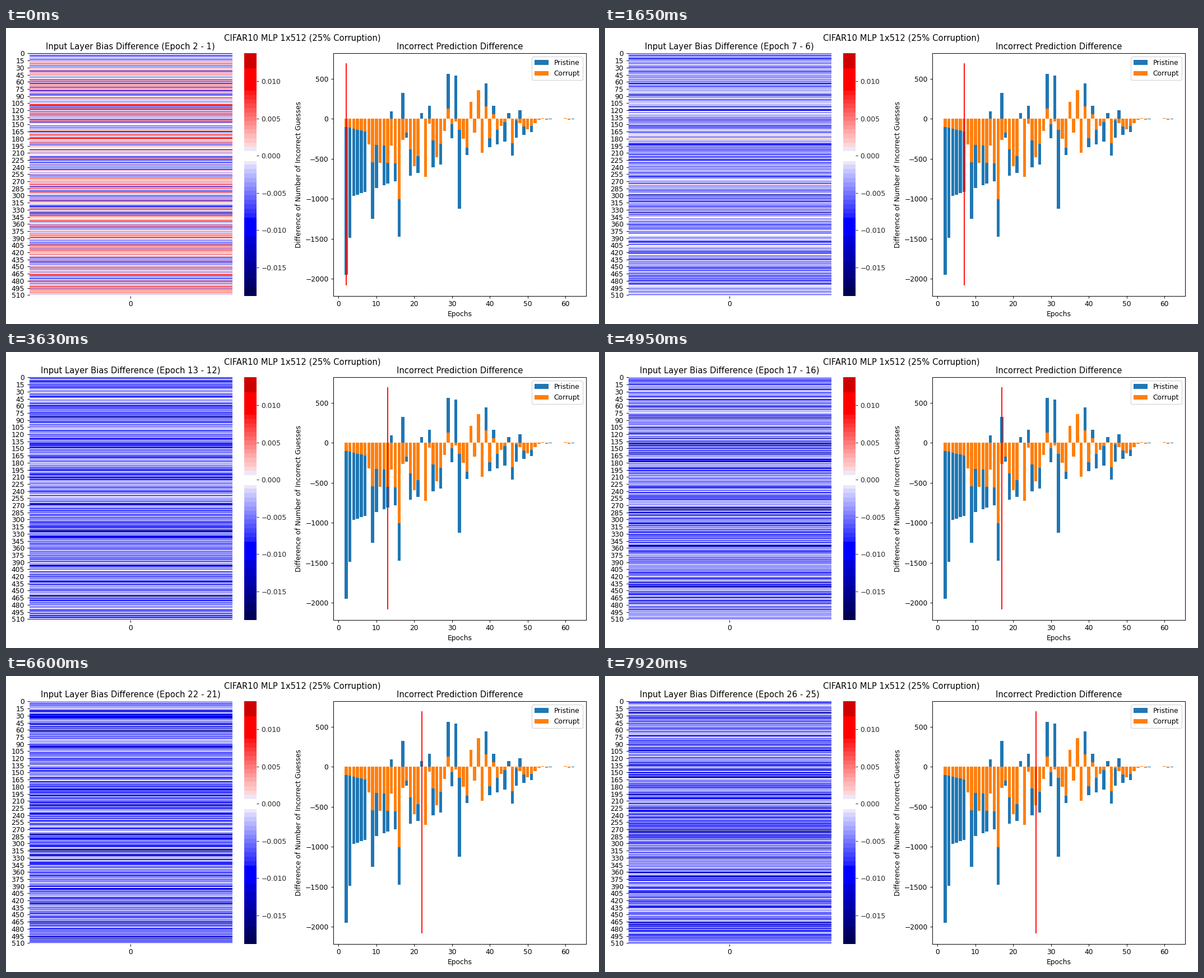
Recreate the animation shown at these times as a matplotlib script. Size 1058 by 529 pixels, loop 8 s.

```python
import numpy as np
import matplotlib.pyplot as plt
from matplotlib.animation import FuncAnimation
from matplotlib.colors import BoundaryNorm, ListedColormap

W, H = 1058, 529
LOOP, INTERVAL, HOLD = 8000, 50, 330      # milliseconds
FIRST, LAST = 2, 26
ROWS = 512
TOP, BOTTOM = 45, 478.5                   # shared by all axes, in pixels
VMIN, VMAX = -0.0188, 0.01376

plt.rcParams["font.family"] = "DejaVu Sans"
fig = plt.figure(figsize=(12, 6), dpi=W / 12, facecolor="white")


def add_axes(left, right):
    return fig.add_axes([left / W, 1 - BOTTOM / H,
                         (right - left) / W, (BOTTOM - TOP) / H])


def color_bands():
    """Return edges, centres and colours of the stepped scale around zero."""
    edges = np.concatenate([
        np.linspace(VMIN, -0.0108, 8),
        np.linspace(-0.0083, -0.0012, 13), [-0.0007, 0.0006],
        np.linspace(0.0012, 0.0087, 14), [0.0117, VMAX]])
    mids = (edges[:-1] + edges[1:]) / 2
    colors = plt.get_cmap("seismic")(0.5 + 0.5 * mids / -VMIN)
    size = np.abs(mids)
    colors[size < 0.0011] = (0.93, 0.905, 0.97, 1)
    colors[size < 0.0002] = (1, 1, 1, 1)
    colors[np.abs(mids - 0.0102) < 0.001] = (1, 0, 0, 1)
    colors[np.abs(mids + 0.0095) < 0.001] = (0, 0, 1, 1)
    colors[-1] = (0.81, 0, 0, 1)
    return edges, mids, colors


def bias_change(epoch):
    """Bias changes fade from mixed signs to mostly negative ones."""
    mixed = np.random.default_rng(3).normal(-0.0008, 0.0047, ROWS)
    settled = -np.random.default_rng([11, epoch]).gamma(2.3, 0.0024, ROWS)
    weight = np.exp((FIRST - epoch) / 5)
    values = weight * mixed + (1 - weight) * settled
    return np.clip(values, VMIN + 1e-6, VMAX - 1e-6)[:, None]


def pristine_counts(epochs):
    """Linear recovery with gaps, plus the outstanding peaks."""
    gaps = {*range(8, 21, 3), *range(22, 29, 2), *range(29, 46, 2), 36, 48, 50}
    peaks = {2: -1950, 3: -1490, 9: -1250, 14: 95, 16: -1475, 17: 320,
             18: -235, 22: 70, 24: 160, 29: 560, 30: -245, 31: 540,
             32: -1125, 39: 440, 41: 165, 45: 75, 46: -460, 48: 105}

    def height(e):
        if e > 51:
            return -5 if e % 6 == 2 else 0
        return peaks.get(e, 0 if e in gaps else 17 * (e - 2) - 1000)

    return [height(e) for e in epochs]


def corrupt_counts(epochs):
    """A curve through a few points, plus the outstanding peaks."""
    curve = {2: -100, 7: -160, 8: -430, 15: -450, 18: -170, 20: -595,
             21: -470, 24: -60, 26: -480, 28: -150, 31: -30, 34: -360,
             36: -170, 40: -240, 45: 10, 47: -20, 50: -130, 53: -15, 54: 0}
    peaks = {16: -1005, 22: 0, 23: -725, 29: 125, 35: 210, 37: 355,
             38: -425, 39: 155, 41: 55, 46: -305}

    def height(e):
        if e > 53:
            return {0: 8, 1: -12}.get(e % 6, 0)
        swing = 110 * (-1) ** e if 8 <= e <= 15 else 0
        return peaks.get(e, np.interp(e, [*curve], [*curve.values()]) + swing)

    return [height(e) for e in epochs]


edges, mids, colors = color_bands()
cmap = ListedColormap(colors)
norm = BoundaryNorm(edges, len(colors))
changes = {e: bias_change(e) for e in range(FIRST, LAST + 1)}

# Heatmap
heat = add_axes(41.5, 403)
image = heat.imshow(changes[FIRST], cmap=cmap, norm=norm, aspect="auto",
                    interpolation="nearest", extent=(0, 1, ROWS, 0))
heat.set_xticks([0.5], ["0"])
labels = range(0, ROWS, 15)
heat.set_yticks([n + 0.5 for n in labels], [str(n) for n in labels])
heat.spines[:].set_visible(False)
heat_title = heat.set_title("")

# Colour scale
scale = add_axes(425, 447)
scale.pcolormesh([0, 1], edges, mids[:, None], cmap=cmap, norm=norm)
scale.set_ylim(VMIN, VMAX)
scale.set_xticks([])
scale.yaxis.tick_right()
ticks = [n / 1000 for n in range(-15, 11, 5)]
scale.set_yticks(ticks, [f"{v:.3f}".replace("-", "\N{MINUS SIGN}") for v in ticks])
scale.tick_params(axis="y", colors="0.15")
scale.spines[:].set_visible(False)

# Bars with the epoch marker
bars = add_axes(584, 1035)
epochs = range(2, 63)
bars.bar(epochs, pristine_counts(epochs), color="C0", label="Pristine")
bars.bar(epochs, corrupt_counts(epochs), color="C1", label="Corrupt")
marker, = bars.plot([FIRST, FIRST], [-2076, 684], color="red", lw=1.5)
bars.set_xlim(-1.39, 65.48)
bars.set_ylim(-2212, 820)
bars.set_title("Incorrect Prediction Difference")
bars.set_xlabel("Epochs")
bars.set_ylabel("Difference of Number of Incorrect Guesses")
bars.legend(loc="upper right")

fig.suptitle("CIFAR10 MLP 1x512 (25% Corruption)")


def update(i):
    # Switch on the tick that contains each change
    epoch = min(FIRST + (i * INTERVAL + 40) // HOLD, LAST)
    image.set_data(changes[epoch])
    heat_title.set_text(f"Input Layer Bias Difference (Epoch {epoch} - {epoch - 1})")
    marker.set_xdata([epoch, epoch])
    return image, heat_title, marker


anim = FuncAnimation(fig, update, frames=LOOP // INTERVAL, interval=INTERVAL,
                     repeat=True, repeat_delay=0, blit=False)
plt.show()
```
